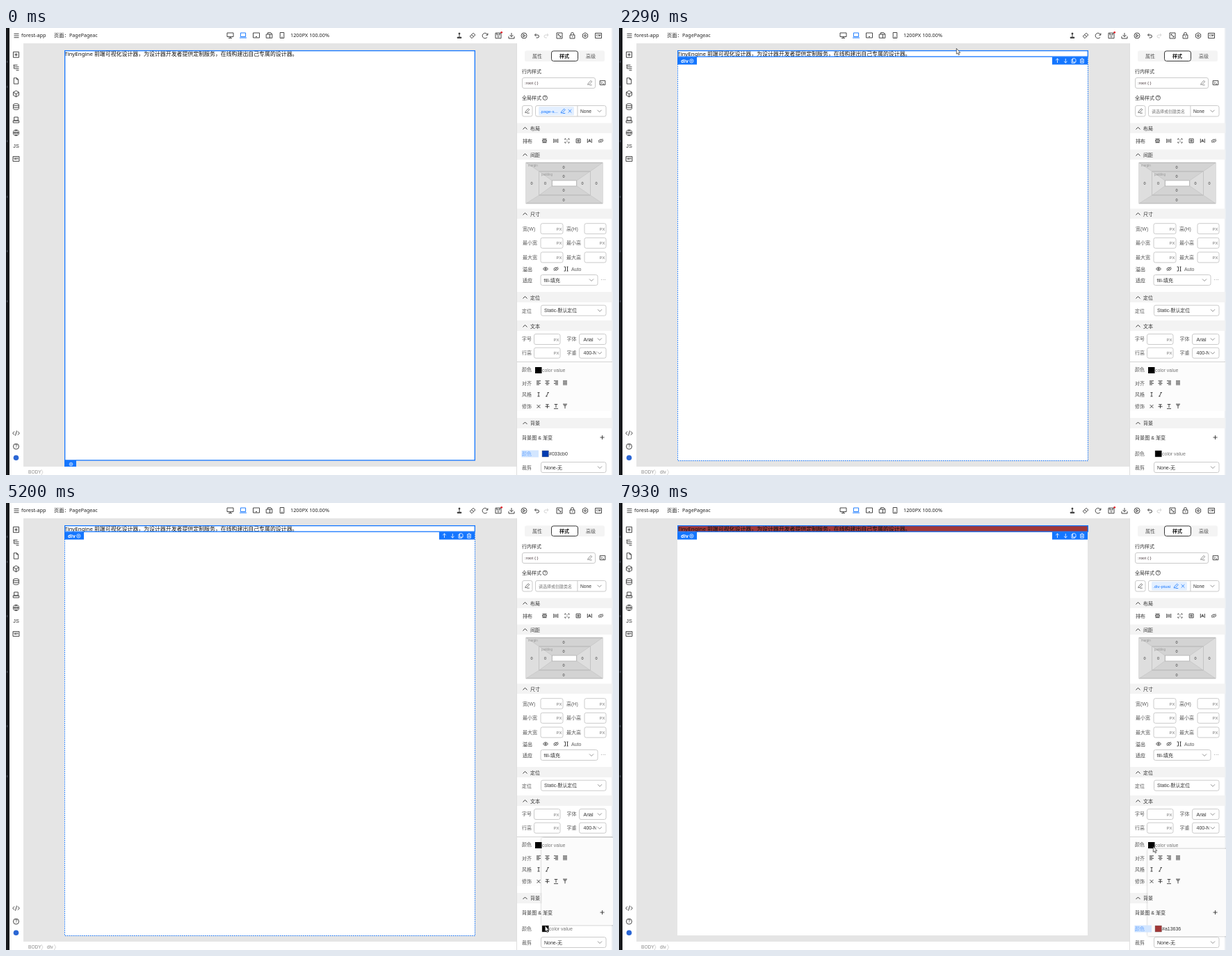
Write an HTML page that moves like this. It is 873x642 px and loops after 8 s.

```html
<!DOCTYPE html>
<html lang="zh-CN">
<head>
<meta charset="utf-8">
<title>页面设计器</title>
<style>
html, body { margin: 0; width: 100%; height: 100%; overflow: hidden; background: #fff; }
svg { display: block; width: 873px; height: 642px; }
text { font-family: "Liberation Sans", "Noto Sans CJK SC", "Noto Sans CJK", sans-serif; white-space: pre; }
.ui { font-family: "Noto Sans", "Noto Sans CJK SC", "Noto Sans CJK", sans-serif; }
.icon { fill: none; stroke: #333; stroke-width: .9; stroke-linejoin: round; }
</style>
</head>
<body>
<svg id="stage" viewBox="0 0 873 642"></svg>
<script>
const LOOP = 8000, BLUE = '#1476ff', INK = '#333', GREY = '#595959', EDGE = '#c6c6c6';
const out = [];
let css = '';
const put = s => out.push(s);
const pct = ms => ms / LOOP * 100 + '%';

// Drawing helpers; text and icons are placed by their vertical centre.
const rect = (x, y, w, h, fill, more = '') => put(`<rect x="${x}" y="${y}" width="${w}" height="${h}" fill="${fill}" ${more}/>`);
const frame = (x, y, w, h, stroke = EDGE, r = 2.5) => rect(x + .5, y + .5, w - 1, h - 1, '#fff', `rx="${r}" stroke="${stroke}" stroke-width=".9"`);
const outline = h => rect(84.65, 32.65, 589.7, h, 'none', `stroke="${BLUE}" stroke-width="1.3"`);
const text = (x, y, s, size = 7, fill = GREY, more = '') => put(`<text x="${x}" y="${y + size * .37}" font-size="${size}" fill="${fill}" ${more}>${s}</text>`);
const ui = (x, y, s, size = 7.3, fill = '#222') => text(x, y, s, size, fill, 'class="ui"');
const icon = (x, y, d, more = '') => put(`<path class="icon" transform="translate(${x} ${y})" d="${d}" ${more}/>`);
const ring = r => `M${-r} 0a${r} ${r} 0 1 0 ${2 * r} 0a${r} ${r} 0 1 0 ${-2 * r} 0`;
const box = (w, h) => `M${-w} ${-h}H${w}V${h}H${-w}Z`;
const stroke = (c, w = .95) => `style="stroke:${c};stroke-width:${w}"`;
const down = (x, y) => icon(x, y, 'M-3-1.5 0 1.5 3-1.5', stroke('#777', .8));
const group = (cls, draw) => { put(`<g class="${cls}">`); draw(); put('</g>'); };

// Times alternate between showing and hiding.
function during(cls, times, draw) {
  const keys = times.map((t, i) => `${pct(t)}{opacity:${i % 2 ? 0 : 1}}`).join('');
  css += `@keyframes ${cls}{${times[0] ? '0%{opacity:0}' : ''}${keys}100%{opacity:${times.length % 2}}}` +
    `.${cls}{animation:${cls} ${LOOP}ms step-end infinite}`;
  group(cls, draw);
}
function travel(cls, points, draw) {
  const at = ([, x, y]) => `{transform:translate(${x}px,${y}px)}`;
  css += `@keyframes ${cls}{0%${at(points[0])}${points.map(p => pct(p[0]) + at(p)).join('')}100%${at(points[points.length - 1])}}` +
    `.${cls}{animation:${cls} ${LOOP}ms linear infinite}`;
  group(cls, draw);
}

const PEN = 'M-2.8 2.8-2.2.6 1.7-3.2 3.2-1.7-.7 2.2ZM-.5 3.2H3.2';
const GEAR = 'M0-4.2 3.6-2.1V2.1L0 4.2-3.6 2.1V-2.1Z' + ring(1.4);
const FILE = 'M-3.2-4.2H1L3.2-2V4.2H-3.2ZM1-4.2V-2H3.2';
const EYE = 'M-3.5 0Q0-4.6 3.5 0 0 4.6-3.5 0Z' + ring(1);
const SLASHED_EYE = 'M-3 1.4Q-3.4-1.8 1-2M3-1.4Q3.4 1.8-1 2M-2.8 2.8 2.8-2.8';

function shell() {
  rect(0, 0, 873, 642, '#fff');
  rect(25, 22, 709.5, 608, '#e5e5e5');
  rect(0, 0, 5, 642, '#17191c');
  for (const y of [47, 83, 161, 241, 319, 391]) rect(1, y, 1.5, 3, '#3c424b');
  rect(734, 22, 1, 620, '#dedede');
  rect(871.5, 0, 1, 642, '#d5dde6');
  rect(84, 32, 590, 589, '#fff');
}

function header() {
  icon(15, 11, 'M-3.5-2.7H3.5M-3.5 0H3.5M-3.5 2.7H3.5');
  ui(22, 10.7, 'forest-app');
  ui(69, 10.7, '页面：');
  ui(91, 10.7, 'PagePageac', 7.1);
  icon(322.5, 10.5, 'M-4.5-3.5H4.5V2H-4.5ZM0 2V4M-2.5 4H2.5');
  icon(341, 10.5, 'M-3.6-3.5H3.6V2H-3.6ZM-5 3.6H5', stroke(BLUE));
  icon(360, 10.5, box(4.5, 3.5) + 'M-1 2H1');
  icon(378.5, 10.5, 'M-4.3-1.5V3.8H4.3V-1.5ZM-2-1.5V-3.8H2.3L4.3-1.5M1-1.5V3.8');
  icon(397, 10.5, box(2.8, 4) + 'M-.8 2.5H.8');
  ui(409, 10.7, '1200PX 100.00%');
  icon(652, 11, 'M0-3V2M-2.8 2.2H2.8V3.5H-2.8ZM-1-3A1 1 0 1 1 1-3 1 1 0 1 1-1-3', 'style="fill:#333"');
  icon(671, 11, 'M-3.8 1 1-3.8 3.8-1-1 3.8ZM-1.4-1.4 1.4 1.4');
  icon(689, 11, 'M3.6-1A3.8 3.8 0 1 0 3 2.4M3.9-3.5V-.8H1.3');
  icon(708, 11, box(4, 3.8) + 'M-2-3.8V-1H2V-3.8M-1.5 1.7H1.5');
  put('<circle cx="712.7" cy="6.3" r="1.4" fill="#e5242d"/>');
  icon(727, 11, 'M0-4V1.5M-2.5-1 0 1.6 2.5-1M-4 1V4H4V1');
  icon(745, 11, ring(4) + 'M-1.2-2V2L2 0Z');
  icon(763.5, 11, 'M-1-3-3-1-1 1M-3-1H1A2 2 0 0 1 1 3H-1');
  icon(777, 11, 'M1-3 3-1 1 1M3-1H-1A2 2 0 0 0-1 3H1', stroke('#d2d2d2'));
  icon(796, 11, box(4, 4) + 'M-2-.5V-2H-.5M2 .5V2H.5M-2-2 2 2');
  icon(814.5, 11, 'M-3.4-1H3.4V4H-3.4ZM-2-1V-2.5A2 2 0 0 1 2-2.5V-1M0 .8V2.2');
  icon(833, 11, GEAR);
  icon(852, 11, box(4.5, 3.6));
  text(849, 11, 'CM', 4, INK, 'font-weight="bold"');
}

function sidebar() {
  const x = 14.5;
  icon(x, 38.3, box(4, 4) + 'M-2.2 0H2.2M0-2.2V2.2');
  icon(x, 57, 'M-4-3.8H2M-2-1.2H4M-2 1.3H4M0 3.8H4M-3-3.8V1.3H-2');
  icon(x, 76, FILE);
  icon(x, 94.5, 'M0-4.4 4-2.2V2.2L0 4.4-4 2.2V-2.2ZM-4-2.2 0 0 4-2.2M0 0V4.4');
  icon(x, 113, 'M-4-2.8A4 1.5 0 0 1 4-2.8V2.8A4 1.5 0 0 1-4 2.8ZM-4-2.8A4 1.5 0 0 0 4-2.8M-4 0A4 1.5 0 0 0 4 0');
  icon(x, 132, 'M-2.8-4H2.8V1H-2.8ZM-4.2 1H4.2V4H-4.2Z');
  icon(x, 150.5, ring(4.1) + 'M-4 0H4M0-4Q-3.6 0 0 4M0-4Q3.6 0 0 4');
  text(10.3, 169.2, 'JS', 7.3, INK);
  icon(x, 188, box(4.5, 3.4));
  text(11.2, 188, 'VAR', 3.2, INK, 'font-weight="bold"');
  icon(x, 582, 'M-2.5-2.6-4.8 0-2.5 2.6M2.5-2.6 4.8 0 2.5 2.6M1-3.6-1 3.6');
  icon(x, 601, ring(4));
  text(12.7, 601, '?', 6.5, INK);
  put('<circle cx="14.5" cy="617.3" r="3.8" fill="#2a66d4"/>');
}

function canvasArea() {
  during('committed', [6970], () => rect(84, 32, 590, 9.5, '#a13636'));
  text(84, 37.2, 'TinyEngine 前端可视化设计器，为设计器开发者提供定制服务，在线构建出自己专属的设计器。', 7.92, '#111', 'class="ui"');
  during('bodySelected', [0, 860], () => {
    outline(588.2);
    rect(84, 621, 17, 9, BLUE);
    icon(93.5, 626.5, ring(2.3) + ring(.8), stroke('#fff', .7));
  });
  during('divSelected', [860], () => {
    outline(8.5);
    rect(84, 42, 28, 10.5, BLUE);
    text(89, 47, 'div', 7.2, '#fff', 'class="ui" font-weight="600"');
    icon(104.3, 47.3, ring(2.7) + ring(1), stroke('#fff', .7));
    rect(623, 41.5, 51, 11, BLUE);
    icon(630.5, 47, 'M0 3V-3M-2.3-.8 0-3 2.3-.8', stroke('#fff', .8));
    icon(642.3, 47, 'M0-3V3M-2.3.8 0 3 2.3.8', stroke('#fff', .8));
    icon(654, 47, 'M-1.5-3.2H1.5L3-1.8V2H-1.5ZM-1.5-2H-3V3.3H1.5V2', stroke('#fff', .8));
    icon(666, 47, 'M-3-2H3M-1-3.2H1M-2.3-2V3.2H2.3V-2M-.8-.5V2M.8-.5V2', stroke('#fff', .8));
    text(59, 638, 'div', 6.6, '#888');
    icon(70.5, 638, 'M-1.2-4 1 0-1.2 4', stroke('#ccc', .8));
  });
  during('divHover', [860, 1460, 2350, 2540], () => text(85, 29, 'div', 6.4, BLUE));
  during('bodyHover', [1460, 2350, 2540, 6970], () =>
    rect(84.5, 32.5, 590, 589, 'none', `stroke="${BLUE}" stroke-width="1" stroke-dasharray="1.6 1.4"`));
  text(32, 638, 'BODY', 6.6, '#888');
  icon(52, 638, 'M-1.2-4 1 0-1.2 4', stroke('#ccc', .8));
}

function section(y, label) {
  icon(746.5, y, 'M-3 1.5 0-1.5 3 1.5', stroke(INK));
  text(754, y, label, 7, INK);
}
function select(x, y, w, label, size = 7) {
  frame(x, y - 8, w, 16);
  text(x + 5, y, label, size, INK);
  down(x + w - 9.5, y);
}
function pixelInput(x, y, w) {
  frame(x, y - 8, w, 16);
  text(x + w - 10, y + .3, 'PX', 6, '#777');
}
function chip(label) {
  rect(766, 113, 51, 12.5, '#e3efff', 'rx="1.5"');
  text(768, 119.5, label, 6.2, BLUE);
  icon(801, 119.3, PEN, stroke(BLUE, .8));
  icon(811, 119.3, 'M-2.3-2.3 2.3 2.3M2.3-2.3-2.3 2.3', stroke(BLUE, .8));
}

function spacingBox() {
  rect(748, 193.5, 110, 58.5, '#d3d3d3', 'stroke="#a9a9a9" stroke-width=".8"');
  put('<path d="M748 193.5 767 206V240L748 252M858 193.5 840 206V240L858 252" fill="#dedede" stroke="#bbb" stroke-width=".5"/>');
  rect(767, 206, 73, 34, '#d3d3d3', 'stroke="#aaa" stroke-width=".8"');
  put('<path d="M767 206 785 219V227L767 240M840 206 821 219V227L840 240" fill="#dedede" stroke="#bbb" stroke-width=".5"/>');
  rect(785.5, 219, 35, 8, '#fff', 'stroke="#aaa" stroke-width=".7"');
  text(751, 197, 'margin', 4.5, '#999');
  text(770, 210.7, 'padding', 4.5, '#999');
  for (const [x, y] of [[802, 199.5], [802, 246.5], [756, 223], [849, 223], [802, 213], [802, 233], [775.5, 223], [829, 223]])
    text(x, y, '0', 5.5, INK, 'text-anchor="middle"');
}

function panelBands() {
  rect(735, 480, 136.5, 70, '#fcfcfc');
  for (const [y, h] of [[136.5, 14.5], [174.5, 14.5], [259.5, 14.5], [379, 15], [420, 15], [560, 15]]) rect(735, y, 136.5, h, '#f3f3f3');
  rect(735, 479, 137, 1, '#d4d4d4');
}

function colorValue(cls, times, fill, label, ink) {
  during(cls, times, () => {
    rect(771, 607, 9.5, 9, fill, 'stroke="#777" stroke-width=".4"');
    text(781, 611.6, label, 7, ink);
  });
}

function panel() {
  rect(746, 32.5, 115, 15.5, '#f4f4f4', 'rx="2.5"');
  frame(784, 32.5, 39, 15.5, '#222', 3);
  text(757, 40.5, '属性');
  text(796, 40.5, '样式', 7, '#111', 'font-weight="bold"');
  text(834, 40.5, '高级');

  text(742, 62.3, '行内样式', 7, INK);
  frame(742, 71, 106, 16);
  text(746, 79, ':root { }', 6.1, '#4a3a3e');
  icon(839.5, 78.7, PEN, stroke('#777', .8));
  icon(858, 78.7, box(3.8, 3) + 'M-2-1.3-.7 0-2 1.3M.3 1.5H2');

  text(742, 100, '全局样式', 7, INK);
  icon(775.3, 100.3, ring(3.2), stroke(INK, .8));
  text(773.8, 100.3, '?', 5.4, INK);
  frame(742, 111, 15.5, 16.5);
  icon(749.6, 119, PEN, stroke('#555', .8));
  frame(761, 111, 102.5, 16.5);
  rect(821.5, 111.5, .9, 15.5, EDGE);
  text(826, 119.4, 'None', 6.7, INK);
  down(853.5, 119.3);
  during('pageClass', [0, 860], () => chip('.page-s...'));
  during('noClass', [860, 6970], () => text(766, 119.5, '请选择或创建类名', 6, '#777'));
  during('divClass', [6970], () => chip('.div-ptuai'));

  section(144, '布局');
  text(743, 162, '排布', 7, INK);
  ['M-3-2.6H3M-3 2.6H3M-2.8-1H2.8V1H-2.8Z', 'M-3-3V3M3-3V3M-1-2.4V2.4M1-2.4V2.4',
    'M-3-1.5V-3H-1.5M1.5-3H3V-1.5M3 1.5V3H1.5M-1.5 3H-3V1.5M-1.3-1.2H-.5M.5-1.2H1.3M-1.3 1.2H-.5M.5 1.2H1.3',
    box(3, 2.8) + box(1, 1), 'M-3-3V3M3-3V3M-1.6 2 0-2.2 1.6 2M-1 .7H1', SLASHED_EYE]
    .forEach((d, i) => icon(774.5 + i * 16.2, 162, d));

  section(182, '间距');
  spacingBox();

  section(267, '尺寸');
  [['宽(W)', '高(H)'], ['最小宽', '最小高'], ['最大宽', '最大高']].forEach(([left, right], i) => {
    const y = 288.2 + i * 20.6;
    text(743, y, left);
    pixelInput(768.5, y, 33);
    text(806, y, right);
    pixelInput(831.5, y, 32);
  });
  text(743, 346, '溢出', 7, INK);
  icon(776, 346, EYE);
  icon(791, 346, SLASHED_EYE);
  icon(805.5, 346, 'M-3-3H-1V3H-3M1-3H3M2-3V3M1 3H3');
  text(813, 346, 'Auto', 7);
  text(743, 362.2, '适应', 7, INK);
  select(768.5, 362, 83, 'fill-填充', 7.2);
  text(855, 361, '···', 8, '#777');

  section(387, '定位');
  text(742, 406.3, '定位');
  select(769, 405.7, 94.5, 'Static-默认定位', 6.9);

  section(428, '文本');
  [['字号', '字体', 'Arial'], ['行高', '字重', '400-N']].forEach(([left, right, value], i) => {
    const y = 447 + i * 19.7;
    text(742, y - .7, left);
    pixelInput(759, y, 38.5);
    text(806.5, y - .7, right);
    frame(824, y - 8, 39.5, 16);
    text(830.5, y, value, 7, INK);
    if (i) rect(848.5, y - 5, 4, 10, '#fff');
    down(853.8, y);
  });
  text(742, 490.3, '颜色');
  rect(761, 487, 9.5, 9, '#000');
  text(771, 491.5, 'color value', 6.9, '#777');
  text(742, 510, '对齐');
  for (const [x, a, b] of [[766, -3, 1], [778.5, -1.7, 1.7], [791, -1, 3], [804, -3, 3]])
    icon(x, 509.5, `M-3-2.7H3M${a}-.9H${b}M-3 .9H3M${a} 2.7H${b}`);
  text(742, 526.5, '风格');
  icon(766, 526.3, 'M-1.5-2.7H1.5M0-2.7V2.7M-1.5 2.7H1.5');
  icon(778.5, 526.3, 'M0-2.7H2.5M1.2-2.7-1.2 2.7M-2.5 2.7H0');
  text(742, 543.5, '修饰');
  icon(766, 543.5, 'M-2.4-2.4 2.4 2.4M2.4-2.4-2.4 2.4');
  icon(778.5, 543.5, 'M-2.3-2.7H2.3M0-2.7V2.7M-3 .2H3');
  icon(791, 543.5, 'M-2.3-3H2.3M0-3V1.6M-3 3.2H3');
  icon(804, 543.5, 'M-3-3.3H3M-2.2-1.6H2.2M0-1.6V3');

  section(567.5, '背景');
  text(742, 588, '背景图 &amp; 渐变', 7.1, INK);
  icon(857.5, 588, 'M-3 0H3M0-3V3');
  text(742, 611.6, '颜色');
  during('styledLabel', [0, 860, 6970], () => {
    rect(741.5, 606.5, 24.5, 10, '#d3e6ff');
    text(742, 611.6, '颜色', 7, '#69a6ff');
  });
  colorValue('pageColor', [0, 860], '#033cb0', '#033cb0', INK);
  colorValue('noColor', [860, 5900], '#000', 'color value', '#777');
  colorValue('divColor', [5900], '#a13636', '#a13636', INK);
  text(742, 631.5, '裁剪');
  select(769, 631, 94.5, 'None-无');
}

const popupCard = (x, y, alpha) => rect(x, y, 150, 125, '#fff', `fill-opacity="${alpha}" rx="2" filter="url(#shadow)"`);

function picker() {
  popupCard(770.5, 481, 1);
  rect(776, 487, 109, 72, 'url(#white)');
  rect(776, 487, 109, 72, 'url(#black)');
  rect(776, 565, 109, 6, 'url(#hue)');
  frame(776, 581, 58, 16);
  const handle = [[0, 776, 559], [5890, 776, 559], [5920, 838, 503], [6130, 848, 513.6]];
  travel('handle', handle, () => put('<circle r="3" fill="none" stroke="#fff" stroke-width="1.2"/>'));
}

put(`<defs>
  <linearGradient id="white"><stop stop-color="#fff"/><stop offset="1" stop-color="#f00"/></linearGradient>
  <linearGradient id="black" x2="0" y2="1"><stop stop-opacity="0"/><stop offset="1"/></linearGradient>
  <linearGradient id="hue">${[0, 60, 120, 180, 240, 300, 360].map(h => `<stop offset="${h / 360}" stop-color="hsl(${h},100%,50%)"/>`).join('')}</linearGradient>
  <filter id="shadow" x="-10%" y="-10%" width="120%" height="120%"><feDropShadow dx="0" dy="0" stdDeviation="1.5" flood-opacity=".35"/></filter>
</defs>`);
shell();
header();
sidebar();
canvasArea();
panelBands();
during('bgOpening', [5190, 5440], () => popupCard(770.5, 481, .9));
during('textOpening', [7890], () => popupCard(760.5, 497, .9));
panel();
during('picker', [5440, 6730], picker);

const route = [
  [0, 827, 32], [310, 827, 32], [480, 575, 60], [560, 500, 66], [640, 423, 54], [700, 463, 37],
  [1230, 463, 37], [1235, 463, 41], [1450, 463, 41], [1650, 440, 75], [1850, 490, 60], [2080, 497, 14], [2230, 485, 29],
  [2310, 485, 29], [2380, 486, 34], [2530, 486, 34], [2620, 490, 75], [2740, 497, 120], [2840, 525, 150],
  [2930, 575, 168], [3050, 670, 195], [3200, 760, 150], [3310, 803, 105], [3440, 796, 41], [3550, 787, 80],
  [4425, 787, 80], [4540, 770, 50], [4740, 714, 230], [4800, 718, 262], [5010, 768, 510], [5180, 775, 607],
  [5640, 775, 607], [5890, 838, 502], [6130, 848, 513], [6330, 848, 513], [6740, 817, 475],
  [7290, 817, 475], [7700, 768, 493], [8000, 768, 493]
];
during('pointer', [100], () => travel('route', route, () =>
  put('<path d="M.3.3V8.3L2 6.8 3.3 9.8 4.6 9.2 3.4 6.4H5.8Z" fill="#fff" stroke="#333" stroke-width=".75"/>')));

document.getElementById('stage').innerHTML = `<style>${css}</style>` + out.join('');
</script>
</body>
</html>
```
